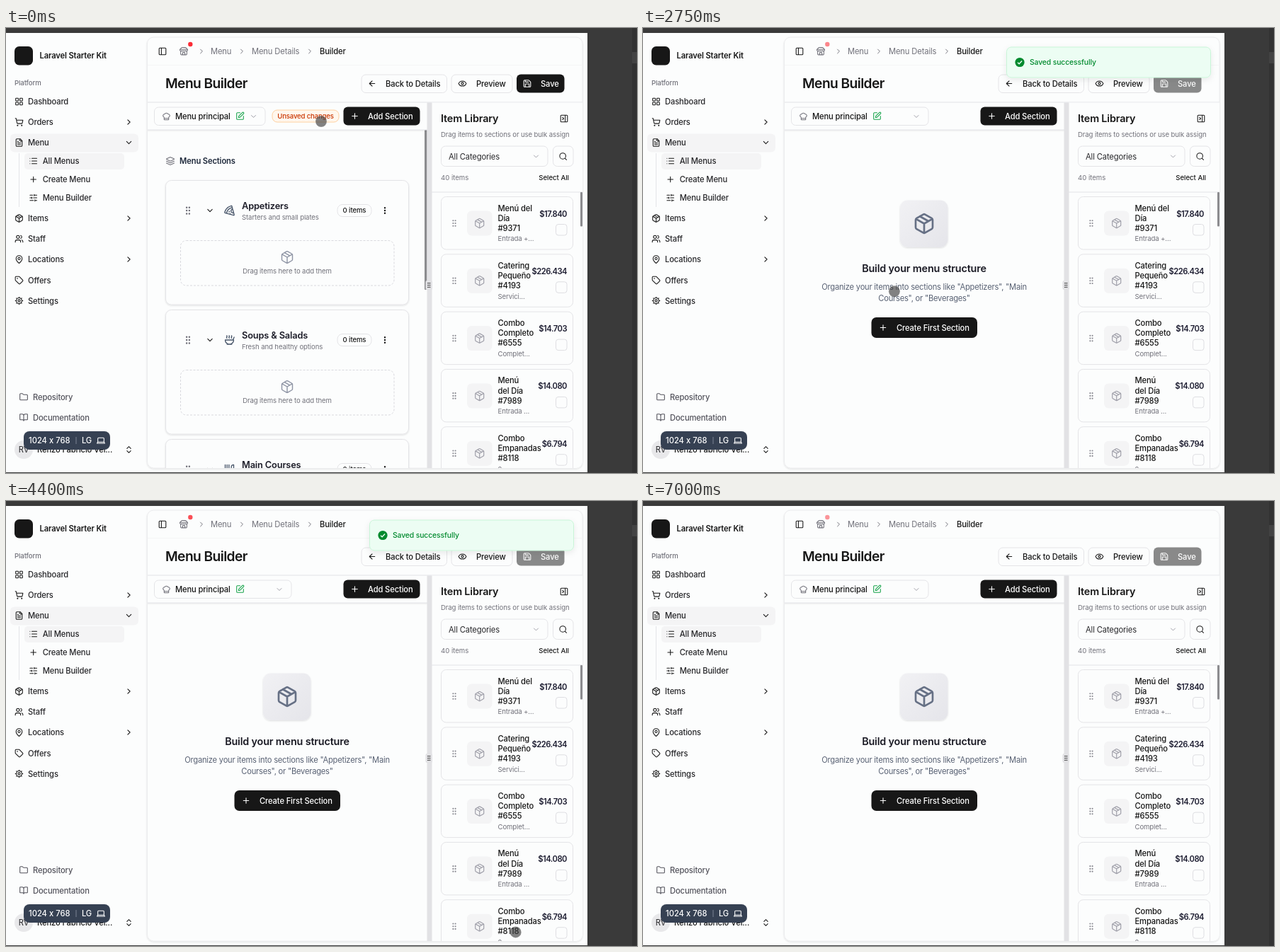
An HTML page for the animation above (7.02 s loop, 891 by 629 pixels).

```html
<!DOCTYPE html>
<html lang="en">
<head>
<meta charset="utf-8">
<title>Menu Builder</title>
<style>
  html, body { margin: 0; width: 100%; height: 100%; overflow: hidden; background: #3a3a3a; }
  svg { display: block; width: 100vw; height: 100vh; }
  text { font-family: Inter, "Open Sans", sans-serif; letter-spacing: -.012em; white-space: pre; }
</style>
</head>
<body>
<svg id="stage" viewBox="0 0 891 629" preserveAspectRatio="none"></svg>
<script>
const LOOP = 7020;
const INK = '#171717', BODY = '#27272a', MUTED = '#71717a', LINE = '#e4e4e7', PAPER = '#fcfdfd';

// Icon outlines on a 24 unit grid
const circ = (x, y, r) => `M${x - r} ${y}a${r} ${r} 0 1 0 ${2 * r} 0a${r} ${r} 0 1 0 ${-2 * r} 0`;
const box = (x, y, s, r) => `M${x + r} ${y}h${s - 2 * r}a${r} ${r} 0 0 1 ${r} ${r}v${s - 2 * r}a${r} ${r} 0 0 1 ${-r} ${r}h${2 * r - s}a${r} ${r} 0 0 1 ${-r} ${-r}v${2 * r - s}a${r} ${r} 0 0 1 ${r} ${-r}z`;
const dots = xs => xs.map(x => [5, 12, 19].map(y => circ(x, y, 1)).join('')).join('');
const steam = x => `M${x} 3c.3.1.8.5.75 1.4-.06.8-.9 1.2-1 2-.05.8.3 1.2.7 1.6`;
const frame = box(3, 3, 18, 2);
const icons = {
  panel: frame + 'M9 3v18',
  close: frame + 'M15 3v18M8 9l3 3-3 3',
  store: 'M15 21v-5a1 1 0 0 0-1-1h-4a1 1 0 0 0-1 1v5M4 11v8a2 2 0 0 0 2 2h12a2 2 0 0 0 2-2v-8M2 7l4.4-4.4A2 2 0 0 1 7.8 2h8.4a2 2 0 0 1 1.4.6L22 7zM2 7v2a3 3 0 0 0 5 1.5 3.5 3.5 0 0 0 5 0 3.5 3.5 0 0 0 5 0A3 3 0 0 0 22 9V7',
  right: 'M9 18l6-6-6-6',
  down: 'M6 9l6 6 6-6',
  updown: 'M7 15l5 5 5-5M7 9l5-5 5 5',
  back: 'M12 19l-7-7 7-7M19 12H5',
  eye: 'M2 12a10.8 10.8 0 0 1 20 0 10.8 10.8 0 0 1-20 0z' + circ(12, 12, 3),
  save: 'M15.2 3a2 2 0 0 1 1.4.6l3.8 3.8a2 2 0 0 1 .6 1.4V19a2 2 0 0 1-2 2H5a2 2 0 0 1-2-2V5a2 2 0 0 1 2-2zM17 21v-7a1 1 0 0 0-1-1H8a1 1 0 0 0-1 1v7M7 3v4a1 1 0 0 0 1 1h7',
  grid: [[3, 3], [14, 3], [14, 14], [3, 14]].map(p => box(...p, 7, 1)).join(''),
  cart: circ(8, 21, 1) + circ(19, 21, 1) + 'M2 2h2l2.7 12.5a2 2 0 0 0 2 1.5h9.8a2 2 0 0 0 1.9-1.5L22 7H5.1',
  file: 'M15 2H6a2 2 0 0 0-2 2v16a2 2 0 0 0 2 2h12a2 2 0 0 0 2-2V7zM14 2v4a2 2 0 0 0 2 2h4M10 9H8M16 13H8M16 17H8',
  list: 'M3 5h.01M3 12h.01M3 19h.01M8 5h13M8 12h13M8 19h13',
  plus: 'M5 12h14M12 5v14',
  sliders: 'M10 5H3M12 19H3M14 3v4M16 17v4M21 12h-9M21 19h-5M21 5h-7M8 10v4M8 12H3',
  cube: 'M11 21.7a2 2 0 0 0 2 0l7-4a2 2 0 0 0 1-1.7V8a2 2 0 0 0-1-1.7l-7-4a2 2 0 0 0-2 0l-7 4A2 2 0 0 0 3 8v8a2 2 0 0 0 1 1.7zM12 22V12M3.3 7l8.7 5 8.7-5M7.5 4.3l9 5.1',
  users: circ(9, 7, 4) + 'M16 21v-2a4 4 0 0 0-4-4H6a4 4 0 0 0-4 4v2M22 21v-2a4 4 0 0 0-3-3.9M16 3.1a4 4 0 0 1 0 7.8',
  pin: circ(12, 10, 3) + 'M20 10c0 5-5.5 10.2-7.4 11.8a1 1 0 0 1-1.2 0C9.5 20.2 4 15 4 10a8 8 0 0 1 16 0',
  tag: circ(7.5, 7.5, .5) + 'M12.6 2.6A2 2 0 0 0 11.2 2H4a2 2 0 0 0-2 2v7.2a2 2 0 0 0 .6 1.4l8.7 8.7a2.4 2.4 0 0 0 3.4 0l6.6-6.6a2.4 2.4 0 0 0 0-3.4z',
  gear: circ(12, 12, 3) + circ(12, 12, 7.5) + 'M12 2v2.5M12 19.5V22M2 12h2.5M19.5 12H22M5 5l1.7 1.7M17.3 17.3L19 19M5 19l1.7-1.7M17.3 6.7L19 5',
  folder: 'M20 20a2 2 0 0 0 2-2V8a2 2 0 0 0-2-2h-7.9a2 2 0 0 1-1.7-.9l-.8-1.2A2 2 0 0 0 7.9 3H4a2 2 0 0 0-2 2v13a2 2 0 0 0 2 2z',
  book: 'M12 7v14M3 18a1 1 0 0 1-1-1V4a1 1 0 0 1 1-1h5a4 4 0 0 1 4 4 4 4 0 0 1 4-4h5a1 1 0 0 1 1 1v13a1 1 0 0 1-1 1h-6a3 3 0 0 0-3 3 3 3 0 0 0-3-3z',
  laptop: 'M18 5a2 2 0 0 1 2 2v8.5l2 4H2l2-4V7a2 2 0 0 1 2-2zM4 16h16',
  search: circ(11, 11, 8) + 'M21 21l-4.3-4.3',
  layers: 'M12.8 2.2a2 2 0 0 0-1.7 0L2.6 6.1a1 1 0 0 0 0 1.8l8.6 3.9a2 2 0 0 0 1.7 0l8.6-3.9a1 1 0 0 0 0-1.8zM2 12.4l9.2 4.4a2 2 0 0 0 1.7 0l9.1-4.4M2 17.4l9.2 4.4a2 2 0 0 0 1.7 0l9.1-4.4',
  hat: 'M17 21a1 1 0 0 0 1-1v-5.4c0-.4.3-.8.7-1A4 4 0 0 0 16.6 6a5 5 0 0 0-9.2 0 4 4 0 0 0-2.1 7.6c.4.2.7.6.7 1V20a1 1 0 0 0 1 1zM6 17h12',
  pen: 'M12 3H5a2 2 0 0 0-2 2v14a2 2 0 0 0 2 2h14a2 2 0 0 0 2-2v-7M18.4 2.6a1 1 0 0 1 3 3l-9 9a2 2 0 0 1-.9.5l-2.9.8a.5.5 0 0 1-.6-.6l.8-2.9a2 2 0 0 1 .5-.9z',
  grip: dots([9, 15]),
  more: dots([12]),
  pizza: 'M12 14l-1 1M13.7 18.2l-1.2 1.4M17.8 5.7A15.7 15.7 0 0 0 5.7 17.8M18.8 9.3a1 1 0 0 0 1 7.7M22 20.7a1 1 0 0 1-1.3 1.3l-18-5a1 1 0 0 1-.7-1.3A19.7 19.7 0 0 1 15.7 2a1 1 0 0 1 1.3.7z',
  soup: 'M12 21a9 9 0 0 0 9-9H3a9 9 0 0 0 9 9zM7 21h10M19.5 12L22 6' + [16.2, 11.2, 6.2].map(steam).join(''),
  fork: 'M3 2v7a2 2 0 0 0 2 2h4a2 2 0 0 0 2-2V2M7 2v20M21 15V2a5 5 0 0 0-5 5v6a2 2 0 0 0 2 2h3v7'
};

// y is the middle of the capital letters
const text = (x, y, s, { size = 11.2, w = 500, c = INK, a = 'start', ls = '' } = {}) =>
  `<text x="${x}" y="${y + size * .36}" font-size="${size}" font-weight="${w}" fill="${c}" text-anchor="${a}"${ls && ` style="letter-spacing:${ls}em"`}>${s}</text>`;
const small = (x, y, s, o) => text(x, y, s, { size: 9.6, w: 400, c: MUTED, ...o });
const icon = (name, x, y, size = 12.8, c = INK, sw = 2) =>
  `<path d="${icons[name]}" transform="translate(${x - size / 2} ${y - size / 2}) scale(${size / 24})" fill="none" stroke="${c}" stroke-width="${sw}" stroke-linecap="round" stroke-linejoin="round"/>`;
const rect = (x, y, x2, y2, r, fill, stroke = 'none', extra = '') =>
  `<rect x="${x}" y="${y}" width="${x2 - x}" height="${y2 - y}" rx="${r}" fill="${fill}" stroke="${stroke}" ${extra}/>`;
const group = (id, s, extra = '') => `<g id="${id}" ${extra}>${s}</g>`;
const clip = (id, s) => `<clipPath id="${id}">${s}</clipPath>`;

function sidebar() {
  const rows = [['grid', 'Dashboard', 104], ['cart', 'Orders', 133, 'right'], ['file', 'Menu', 162, 'down'],
    ['cube', 'Items', 269, 'right'], ['users', 'Staff', 298], ['pin', 'Locations', 327, 'right'],
    ['tag', 'Offers', 356.5], ['gear', 'Settings', 385.5]];
  const subs = [['list', 'All Menus', 188], ['plus', 'Create Menu', 214], ['sliders', 'Menu Builder', 240]];
  const links = [['folder', 'Repository', 521.5], ['book', 'Documentation', 550.5]];
  return rect(12, 26, 38, 52.5, 6.5, INK) + text(47.5, 39, 'Laravel Starter Kit', { w: 600 })
    + small(12, 78, 'Platform', { w: 500 })
    + rect(6, 149.5, 187, 175.5, 6, '#f4f4f5') + rect(26, 177, 167, 200, 5, '#f4f4f5')
    + rect(18, 177, 19, 253, 0, LINE)
    + rows.map(([i, s, y, end]) => icon(i, 18.5, y) + text(31, y, s, { c: BODY, w: s === 'Menu' ? 500 : 450 })
      + (end ? icon(end, 173.5, y) : '')).join('')
    + subs.map(([i, s, y]) => icon(i, 38.7, y) + text(51.7, y, s, { c: BODY, w: 450 })).join('')
    + links.map(([i, s, y]) => icon(i, 25, y, 12.8, '#52525b') + text(38, y, s, { c: '#52525b', w: 450 })).join('')
    + `<circle cx="25" cy="596" r="13" fill="#e8e8ea"/>` + text(25, 596, 'RV', { a: 'middle', w: 400, c: BODY })
    + text(44, 596, 'Renzo Fabricio Vel...') + icon('updown', 173.5, 596)
    + rect(25, 570, 147, 596, 8, '#364153')
    + text(32, 583, '1024 x 768', { c: '#fff', ls: '.001' }) + rect(98.5, 578, 99.5, 588, 0, '#7b8494')
    + text(107, 583, 'LG', { c: '#fff' }) + icon('laptop', 134, 583, 13, '#fff');
}

function header() {
  const button = (x, x2, i, ix, s, tx) => rect(x, 66, x2, 91.5, 6, PAPER, LINE)
    + icon(i, ix, 78.5) + text(tx, 78.5, s);
  return icon('panel', 221, 33) + icon('store', 251, 33, 13, MUTED)
    + `<circle id="dot" cx="260.3" cy="23" r="3.2" fill="#fb2c36"/>`
    + [276, 333, 429].map(x => icon('right', x, 33, 11.5, MUTED)).join('')
    + text(289, 33, 'Menu', { w: 400, c: MUTED }) + text(347, 33, 'Menu Details', { w: 400, c: MUTED })
    + text(443, 33, 'Builder', { w: 450 })
    + rect(200, 52, 814, 53, 0, '#f5f5f6')
    + text(225, 78.5, 'Menu Builder', { size: 19.2, w: 600, ls: '-.03' })
    + button(502, 622.5, 'back', 517, 'Back to Details', 536)
    + button(629, 715, 'eye', 644.5, 'Preview', 664)
    + group('save', rect(721, 65.5, 788.5, 91.5, 6, INK) + icon('save', 736, 78.5, 12.8, '#fff') + text(755, 78.5, 'Save', { c: '#fff' }))
    + rect(200, 104.5, 814, 105.5, 0, LINE);
}

function toolbar() {
  const picker = (x2, cx) => rect(209.5, 112, x2, 137.5, 6, PAPER, LINE) + icon('down', cx, 125, 12, '#a1a1aa');
  return rect(200, 144, 595, 147, 0, 'url(#fade)') + rect(200, 143.5, 595, 144.5, 0, '#e6e6e9')
    + group('wide', picker(403, 386)) + group('narrow', picker(366, 349.5)
      + rect(376, 116, 470, 133, 7, '#fff7ed', '#ffd0a0')
      + small(423, 124.5, 'Unsaved changes', { w: 500, c: '#ca3500', a: 'middle', ls: '-.018' }))
    + icon('hat', 226.5, 125, 12.8, MUTED) + text(239, 125, 'Menu principal') + icon('pen', 330.5, 124.5, 12.8, '#16a34a')
    + rect(476.5, 111.5, 584.5, 137.5, 6, INK) + icon('plus', 492.5, 124.5, 12.8, '#fff') + text(511, 124.5, 'Add Section', { c: '#fff' });
}

function section(k, i, title, sub) {
  return `<g transform="translate(0 ${183 * k})">`
    + rect(225.5, 215.5, 568.5, 391, 8, PAPER, LINE, 'filter="url(#soft)"')
    + icon('grip', 257, 258, 15, MUTED) + icon('down', 288, 258, 12.8) + icon(i, 315.5, 258, 16, '#475569')
    + text(333, 251.5, title, { size: 12.8, w: 600, c: '#1c1c28' }) + small(333, 267.5, sub)
    + rect(468, 249.5, 516, 266.5, 7, PAPER, LINE) + small(492, 258, '0 items', { w: 500, c: INK, a: 'middle' })
    + icon('more', 535, 258, 13, INK, 2.4)
    + rect(246.5, 300.5, 548, 364, 8, PAPER, '#d9d9de', 'stroke-dasharray="3 2"')
    + icon('cube', 397, 324, 20, '#8e94a4', 1.7) + small(397, 343.5, 'Drag items here to add them', { a: 'middle' }) + '</g>';
}

function sections() {
  return icon('layers', 232, 188, 13, MUTED) + text(245, 188, 'Menu Sections', { w: 600, c: '#1e293b' })
    + section(0, 'pizza', 'Appetizers', 'Starters and small plates')
    + section(1, 'soup', 'Soups &amp; Salads', 'Fresh and healthy options')
    + section(2, 'fork', 'Main Courses', 'Hearty main dishes')
    + rect(591, 144, 594.5, 370, 1, '#8c8c8f');
}

function empty() {
  const para = { a: 'middle', w: 400, c: '#596274', ls: '-.021' };
  return rect(363, 243.5, 430.5, 310, 11, 'url(#tile)', 'none', 'filter="url(#soft)"')
    + icon('cube', 397, 276.5, 32, '#667085')
    + text(397, 340, 'Build your menu structure', { size: 14.4, w: 600, c: '#1a1a24', a: 'middle' })
    + text(397, 366, 'Organize your items into sections like "Appetizers", "Main', para)
    + text(397, 382, 'Courses", or "Beverages"', para)
    + rect(322.5, 409, 472, 438, 7, INK)
    + icon('plus', 339, 423.5, 12.8, '#fff') + text(358, 423.5, 'Create First Section', { c: '#fff' });
}

function library() {
  const items = [['Menú del', 'Día', '#9371', 'Entrada +...', '$17.840'], ['Catering', 'Pequeño', '#4193', 'Servici...', '$226.434'],
    ['Combo', 'Completo', '#6555', 'Complet...', '$14.703'], ['Menú', 'del Día', '#7989', 'Entrada ...', '$14.080'],
    ['Combo', 'Empanadas', '#8118', '2...', '$6.794']];
  const card = ([a, b, num, sub, price], k) => `<g transform="translate(0 ${81.3 * k})">`
    + rect(614.5, 238.5, 800.5, 313, 7, PAPER, LINE) + icon('grip', 633, 276, 12.8, '#8a8a92')
    + rect(651, 258.5, 686.5, 293.5, 6.5, '#f4f4f5') + icon('cube', 668.7, 276, 16, '#a0a0aa', 1.8)
    + [a, b, num].map((s, n) => text(694.5, 254.5 + 14.1 * n, s)).join('')
    + small(694.5, 298, sub) + text(792, 262.5, price, { w: 600, c: '#1c1c30', a: 'end', ls: '-.045' })
    + rect(776.5, 277.5, 792, 293, 3.5, PAPER, '#dedee2') + '</g>';
  return rect(601, 105.5, 814, 622, 0, PAPER)
    + text(614, 128, 'Item Library', { size: 14.4, w: 600 }) + icon('close', 788, 128)
    + small(614, 150.5, 'Drag items to sections or use bulk assign')
    + rect(614.5, 167, 765, 195.5, 6, PAPER, LINE) + text(625, 181.5, 'All Categories', { w: 400, c: BODY }) + icon('down', 748.5, 181.5, 12, '#a1a1aa')
    + rect(772.5, 167, 801, 195.5, 6, PAPER, LINE) + icon('search', 786.7, 181.5)
    + small(614, 212, '40 items', { ls: '-.001' }) + small(795, 212, 'Select All', { w: 500, c: INK, a: 'end', ls: '-.001' })
    + rect(601, 231.5, 814, 232.5, 0, LINE) + items.map(card).join('')
    + rect(811, 232, 814, 280.5, 1, '#8c8c8f')
    + rect(594.5, 105.5, 601.5, 622, 0, '#e2e2e5') + rect(592.5, 357, 602, 370, 2, '#e2e2e5') + icon('grip', 597.3, 363.5, 9.5, INK, 2.2);
}

const toast = rect(513.5, 27, 801.5, 70, 6.5, '#ecfdf3', '#c9f5d8', 'filter="url(#lift)"')
  + '<circle cx="532" cy="48.5" r="6.6" fill="#008a2e"/><path d="M529 48.7l2.1 2.1 4-4.3" fill="none" stroke="#ecfdf3" stroke-width="1.4"/>'
  + text(546, 48.5, 'Saved successfully', { size: 10.4, c: '#008a2e' });

const shadow = (id, dy, blur, o) => `<filter id="${id}" x="-20%" y="-30%" width="140%" height="170%"><feDropShadow dx="0" dy="${dy}" stdDeviation="${blur}" flood-color="#000" flood-opacity="${o}"/></filter>`;
const stage = document.getElementById('stage');
stage.innerHTML = '<defs>' + shadow('soft', 1, 1, .12) + shadow('lift', 3, 4, .08)
  + '<linearGradient id="tile" x2="1" y2="1"><stop stop-color="#f1f1f4"/><stop offset="1" stop-color="#e5e5ea"/></linearGradient>'
  + '<linearGradient id="fade" x2="0" y2="1"><stop stop-color="#000" stop-opacity=".07"/><stop offset="1" stop-color="#000" stop-opacity="0"/></linearGradient>'
  + clip('page', rect(0, 7, 821, 628, 0, '#000')) + clip('card', rect(199.5, 13, 814, 622, 9, '#000')) + '</defs>'
  + rect(0, 0, 891, 629, 0, '#3a3a3a') + rect(884, 0, 891, 629, 0, '#323232') + rect(884, 34, 891, 50, 0, '#434343')
  + '<g clip-path="url(#page)">' + rect(0, 7, 821, 628, 0, PAPER) + sidebar()
  + rect(199.5, 13, 814, 622, 9, PAPER, '#ececee', 'filter="url(#soft)"')
  + '<g clip-path="url(#card)">' + group('filled', sections()) + group('empty', empty())
  + toolbar() + header() + library() + '</g>' + group('toast', toast) + '</g>'
  + '<circle id="cursor" r="8" fill="#3c3c3c" fill-opacity=".64" stroke="#fff" stroke-opacity=".2"/>';

const el = id => document.getElementById(id);
const show = (id, on) => el(id).setAttribute('display', on ? 'inline' : 'none');
const clamp = v => Math.min(1, Math.max(0, v));

function bezier(x1, y1, x2, y2) {
  const at = (a, b, s) => 3 * a * s * (1 - s) ** 2 + 3 * b * s * s * (1 - s) + s ** 3;
  return x => {
    let lo = 0, hi = 1;
    for (let n = 0; n < 24; n++) {
      const mid = (lo + hi) / 2;
      if (at(x1, x2, mid) < x) lo = mid; else hi = mid;
    }
    return at(y1, y2, (lo + hi) / 2);
  };
}
const ease = bezier(.25, .1, .25, 1), pulse = bezier(.4, 0, .6, 1);

// Pointer path: time, x, y
const first = [[0, 445, 132], [60, 445, 132], [240, 396, 143], [740, 776, 89], [790, 785, 96], [830, 774, 94], [900, 769, 76],
  [960, 774, 77], [2440, 774, 77], [2580, 670, 94], [2750, 355, 372], [2930, 348, 396], [3090, 348, 396],
  [3320, 405, 424], [3780, 202, 598], [3810, 204, 597], [4160, 500, 575], [4525, 770, 622]];
const second = [[6190, 780, 24], [6430, 852, 607], [6490, 852, 607], [6740, 868, 638]];

// Smooth curve through the keys; flat where an axis turns or rests
function slope(k, i, axis) {
  if (!i || i === k.length - 1) return 0;
  const a = k[i][axis] - k[i - 1][axis], b = k[i + 1][axis] - k[i][axis];
  if (a * b <= 0) return 0;
  const da = a / (k[i][0] - k[i - 1][0]), db = b / (k[i + 1][0] - k[i][0]);
  return 2 * da * db / (da + db);
}
function along(k, t, axis) {
  let i = 0;
  while (i < k.length - 2 && t >= k[i + 1][0]) i++;
  const h = k[i + 1][0] - k[i][0], s = clamp((t - k[i][0]) / h), r = 1 - s;
  return (1 + 2 * s) * r * r * k[i][axis] + s * r * r * h * slope(k, i, axis)
    + s * s * (3 - 2 * s) * k[i + 1][axis] - s * s * r * h * slope(k, i + 1, axis);
}

function draw(t) {
  const saved = t >= 1890;
  show('filled', !saved);
  show('narrow', !saved);
  show('empty', saved);
  show('wide', saved);
  el('save').setAttribute('opacity', 1 - .5 * ease(clamp((t - 1250) / 150)));

  const beat = t % 2000 / 1000;
  el('dot').setAttribute('opacity', beat < 1 ? 1 - .5 * pulse(beat) : .5 + .5 * pulse(beat - 1));

  const shown = ease(clamp((t - 1905) / 400)) - ease(clamp((t - 4735) / 400));
  show('toast', shown > .002);
  el('toast').setAttribute('opacity', shown);
  el('toast').setAttribute('transform', `translate(0 ${-43 * (1 - shown)})`);

  const path = t < 4540 ? first : second;
  show('cursor', t < 4540 || (t >= 6190 && t < 6740));
  el('cursor').setAttribute('transform', `translate(${along(path, t, 1)} ${along(path, t, 2)})`);
}

const start = performance.now();
function tick() {
  draw((performance.now() - start) % LOOP);
  requestAnimationFrame(tick);
}
tick();
</script>
</body>
</html>
```
